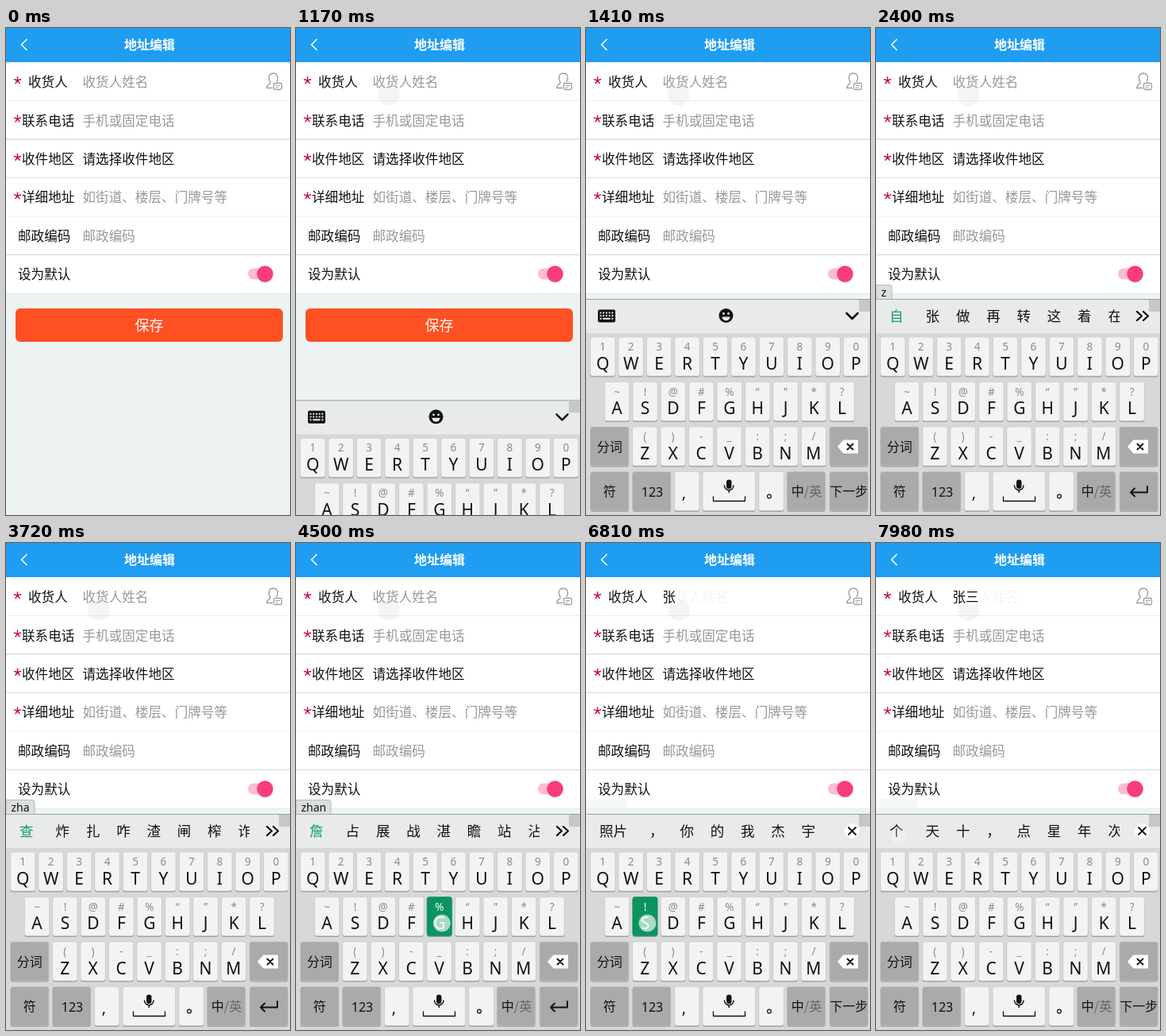
These frames come from a looping animation (358 by 613 pixels, 8000 ms). An HTML page:

```html
<!DOCTYPE html>
<html lang="zh-CN">
<head>
<meta charset="utf-8">
<title>地址编辑</title>
<style>
  html, body { margin: 0; width: 100%; height: 100%; overflow: hidden; background: #edf2f3; }
  svg { display: block; }
  #stage { width: 358px; height: 613px; }
  text { font-family: "Noto Sans CJK SC", "Noto Sans CJK", sans-serif; white-space: pre; }
  .latin { font-family: "Noto Sans", "Open Sans", sans-serif; }
  .key .hint { fill: #8a8a8a; }
  .key.down .face { fill: #0b9460; stroke: #0b9460; }
  .key.down text { fill: #fff; }
  .line { fill: none; stroke-linecap: round; stroke-linejoin: round; }
</style>
</head>
<body>
<svg id="stage" viewBox="0 0 358 613"></svg>
<script>
const LOOP = 8000;
const KEYBOARD_HEIGHT = 272;
const GREEN = '#0f9d6a';

// Each step runs from start to end; its outcome appears on release.
const steps = [
  { start: 2190, end: 2400, key: 'Z', pinyin: 'z', words: '自 张 做 再 转 这 着 在' },
  { start: 2790, end: 3060, key: 'H', pinyin: 'zh', words: '这 张 中 着 只 真 正 知' },
  { start: 3450, end: 3720, key: 'A', pinyin: 'zha', words: '查 炸 扎 咋 渣 闸 榨 诈' },
  { start: 4050, end: 4320, key: 'N', pinyin: 'zhan', words: '詹 占 展 战 湛 瞻 站 沾' },
  { start: 4470, end: 4740, key: 'G', pinyin: 'zhang', words: '张 长 章 掌 涨 丈 仗 帐' },
  { start: 5190, end: 5370, pinyin: '', entered: '张', words: '照片 ， 你 的 我 杰 宇' },
  { start: 6810, end: 7020, key: 'S', pinyin: 's', words: '三 是 上 说 所 时 谁 收' },
  { start: 7740, end: 7980, pinyin: '', entered: '张三', words: '个 天 十 ， 点 星 年 次' }
];
const RELEASE = 120;

const rect = (x, y, w, h, fill, r = 0, extra = '') =>
  `<rect x="${x}" y="${y}" width="${w}" height="${h}" rx="${r}" fill="${fill}" ${extra}/>`;
const path = (d, stroke, width, extra = '') =>
  `<path class="line" d="${d}" stroke="${stroke}" stroke-width="${width}" ${extra}/>`;
const label = (str, x, cy, size, fill = '#111', anchor = 'start', extra = '') =>
  `<text x="${x}" y="${(cy + size * 0.37).toFixed(2)}" font-size="${size}" fill="${fill}" text-anchor="${anchor}" ${extra}>${str}</text>`;

function star(x, y) {
  let d = '';
  for (let i = 0; i < 5; i++) {
    const a = (i * 72 - 90) * Math.PI / 180;
    d += `M${x} ${y}l${(4.3 * Math.cos(a)).toFixed(2)} ${(4.3 * Math.sin(a)).toFixed(2)}`;
  }
  return path(d, '#cc1238', 1.5);
}

function form() {
  const rows = [
    ['收货人', 28, ''],
    ['联系电话', 20, '手机或固定电话'],
    ['收件地区', 20, '请选择收件地区'],
    ['详细地址', 20, '如街道、楼层、门牌号等'],
    ['邮政编码', 15, '邮政编码'],
    ['设为默认', 15, '']
  ];
  const rules = ['#ebeded', '#c9cccc', '#dde1e1', '#eceeee', '#d3d9da', '#e8eded'];
  let out = rect(0, 0, 358, 613, '#edf2f3') + rect(0, 43, 358, 291, '#fff') +
    rect(0, 0, 358, 43, '#1e9df1') + label('地址编辑', 181, 21, 16, '#fff', 'middle', 'font-weight="700"') +
    path('M26 14.5L19.5 21L26 27.5', '#fff', 1.7);
  rows.forEach(([name, x, hint], i) => {
    const cy = 68 + i * 48.4;
    if (i < 4) out += star(14.5, cy - 2);
    out += label(name, x, cy, 16.6) + label(hint, 96.5, cy, 16.6, i === 2 ? '#111' : '#999') +
      rect(0, 91 + i * 48.5, 358, 1, rules[i]);
  });
  return out +
    path('M337 57c-4 0-6 3-5.500 6.500c.3 3 1.500 4 1.800 5.500c-1 2-4.300 2-4.800 6.500h7M337 57c4 0 6 3 5.500 6.500c-.2 2-.7 3-1.300 4', '#9aa0a2', 1.4) +
    rect(337.5, 69.500, 10, 8, '#fff', 1.5, 'stroke="#9aa0a2" stroke-width="1.3"') +
    path('M340 72.500h5M340 75h3', '#9aa0a2', 1) +
    rect(305, 302.500, 28, 14, '#fcbcd2', 7) +
    '<circle cx="326.500" cy="310.500" r="10.300" fill="#d5c5cb"/><circle cx="326.500" cy="309.500" r="10.200" fill="#f93c7c"/>' +
    rect(12, 353, 337, 42, '#ff5023', 6) + label('保存', 180.5, 374, 18, '#fff', 'middle');
}

const keyAt = {};

function keyBase(x, y, w, fill) {
  return rect(x, y + 1.5, w, 49, '#a0a1a2', 3) +
    rect(x, y, w, 49, fill, 3, 'class="face" stroke="#c6c7c8" stroke-width=".6"');
}

function letterRow(letters, hints, firstX, y) {
  return [...letters].map((c, i) => {
    const x = firstX + i * 35.45;
    keyAt[c] = [x, y + 33];
    return `<g class="key" id="key${c}">` + keyBase(x - 15.7, y, 31.4, '#f3f3f3') +
      label(hints[i], x, y + 12, 13.5, '#8a8a8a', 'middle', 'class="latin hint"') +
      label(c, x, y + 33, 21, '#111', 'middle', 'class="latin"') + '</g>';
  }).join('');
}

function keyboard() {
  const dark = '#a8aaab', light = '#f3f3f3';
  const dots = [0, 1, 2].map(r => [0, 1, 2, 3, 4].map(c =>
    r === 2 && c > 0 && c < 4 ? '' : rect(17.5 + c * 3.7, 357.5 + r * 3.7, 2, 2, '#e8e9e9')).join('')).join('');
  return rect(0, 341, 358, 280, '#d6d8d9') + rect(0, 341, 358, 43, '#e9ebeb') +
    rect(0, 341, 358, 1, '#93a5a1') +
    rect(344, 342, 14, 15, '#c6c8c8') +
    '<g id="tools">' + rect(15, 354.500, 22, 16, '#111', 2) + dots + rect(21.2, 364.900, 9.4, 2, '#e8e9e9') +
    '<circle cx="176.500" cy="362" r="9" fill="#111"/><circle cx="173.500" cy="359.500" r="1.400" fill="#e9ebeb"/><circle cx="179.500" cy="359.500" r="1.400" fill="#e9ebeb"/>' +
    '<path d="M171.500 363.500h10a5 5 0 0 1-10 0z" fill="#e9ebeb"/>' +
    path('M328.500 359l7 7l7-7', '#111', 2.5) + '</g>' +
    '<svg width="307" height="613"><g id="words"></g></svg>' +
    '<g id="more">' + path('M329 357l6 5.500l-6 5.500M337 357l6 5.500l-6 5.500', '#111', 2.3) + '</g>' +
    '<g id="close"><circle cx="335.500" cy="362.500" r="9.500" fill="#fff"/>' + path('M331 358l9 9M340 358l-9 9', '#111', 1.8) + '</g>' +
    letterRow('QWERTYUIOP', '1234567890', 21.2, 389) +
    letterRow('ASDFGHJKL', '~!@#%“”*?', 39, 445.5) +
    letterRow('ZXCVBNM', '()-_:;/', 74.2, 502) +
    keyBase(5.5, 502, 48.5, dark) + label('分词', 29.7, 527, 16, '#111', 'middle') +
    keyBase(307, 502, 48.5, dark) +
    '<path d="M317 527l7.500-8.500h18.500v17h-18.500z" fill="#fff"/>' + path('M329.500 523.500l7 7M336.500 523.500l-7 7', '#111', 1.9) +
    keyBase(5.5, 558.500, 48.5, dark) + label('符', 29.7, 583.5, 16, '#111', 'middle') +
    keyBase(58.5, 558.500, 48.5, dark) + label('123', 83.5, 584, 16, '#111', 'middle', 'class="latin"') +
    keyBase(111.5, 558.500, 31.4, light) + label(',', 123.5, 584.5, 20, '#111', 'middle', 'class="latin"') +
    keyBase(147, 558.500, 66.5, light) +
    rect(177, 568.500, 6.5, 11.5, '#111', 3.2) + path('M174.500 576a5.700 5.700 0 0 0 11.500 0M180.200 582v2.500', '#111', 1.5) +
    path('M160.500 590v5.500h40V590', '#111', 1.3) +
    keyBase(218, 558.500, 31.4, light) + '<circle cx="231" cy="589.500" r="2.400" fill="none" stroke="#111" stroke-width="1.200"/>' +
    keyBase(253.3, 558.500, 48.5, dark) +
    label('中<tspan fill="#666">/英</tspan>', 278, 583.5, 16, '#111', 'middle') +
    keyBase(307, 558.500, 48.5, dark) +
    '<g id="next">' + label('下一步', 331.2, 583.5, 16, '#111', 'middle') + '</g>' +
    '<g id="return">' + path('M342 577v7.500h-21M326 579.500l-5 5l5 5', '#111', 2) + '</g>';
}

const stage = document.getElementById('stage');
stage.innerHTML = form() +
  '<circle id="tap" cx="117" cy="84" r="14" fill="#bbb"/>' +
  '<g id="name"></g><g id="trace">' + rect(0, 322, 52, 12, '#f7f8f8') + '</g>' +
  '<g id="keyboard">' + keyboard() + '</g><g id="popup"></g>' +
  '<circle id="touch" r="11" fill="#fff" stroke="#000" stroke-opacity=".1"/>';

const $ = id => document.getElementById(id);
const show = (id, on) => { $(id).style.display = on ? '' : 'none'; };
const clamp = v => Math.min(1, Math.max(0, v));

function wordList(words, highlighted) {
  let x = 52.2;
  return words.split(' ').map((word, i) => {
    const width = 17.5 * word.length;
    if (i === 0) {
      x = 34.7 + width;
      return label(word, 17, 362.5, 17.5, highlighted ? GREEN : '#111');
    }
    const cell = width + 20.8;
    x += cell;
    return label(word, x - cell / 2, 362.5, 17.5, '#111', 'middle');
  }).join('');
}

function pinyinPopup(text) {
  if (!text) return '';
  const width = 13 + [...text].reduce((w, c) => w + (c === 'z' ? 7 : 8), 0);
  return `<path d="M0 323.500H${width - 3}q3 0 3 3V341.500H0z" fill="#dcdfe0" stroke="#a9adae" stroke-width=".8"/>` +
    label(text, 6.5, 333, 14, '#111', 'start', 'class="latin"');
}

function nameField(entered) {
  const hint = label('收货人姓名', 96.5, 68, 16.6, entered ? '#f4f4f4' : '#999');
  if (!entered) return hint;
  return hint + rect(96, 58, 16.6 * entered.length + 1, 20, '#fff') + label(entered, 96.5, 68, 16.6);
}

let shown = null;

function showState(index) {
  if (index === shown) return;
  shown = index;
  const state = steps[index] || { pinyin: '', words: '' };
  const entered = steps.slice(0, index + 1).reduce((s, step) => step.entered || s, '');
  $('words').innerHTML = state.words ? wordList(state.words, state.pinyin) : '';
  $('popup').innerHTML = pinyinPopup(state.pinyin);
  $('name').innerHTML = nameField(entered);
  show('tools', index < 0);
  show('more', state.pinyin);
  show('close', index >= 0 && !state.pinyin);
  show('next', !state.pinyin);
  show('return', state.pinyin);
  show('trace', entered && !state.pinyin);
}

function render(t) {
  let index = -1;
  steps.forEach((step, i) => { if (t >= step.end - RELEASE) index = i; });
  showState(index);

  const rise = clamp((t - 1095) / 310);
  $('keyboard').setAttribute('transform', `translate(0 ${(KEYBOARD_HEIGHT * Math.pow(1 - rise, 2.7)).toFixed(2)})`);
  show('keyboard', rise > 0);

  $('tap').setAttribute('opacity', t < 900 ? 0 : 0.15 + 0.35 * clamp((1150 - t) / 150));

  let opacity = 0;
  for (const step of steps) {
    const active = t >= step.start && t < step.end;
    if (step.key) $('key' + step.key).classList.toggle('down', active && t < step.end - RELEASE);
    const lingers = step === steps[steps.length - 1];
    if (!active && !(lingers && t >= step.end)) continue;
    const [x, y] = step.key ? keyAt[step.key] : [29, 369];
    $('touch').setAttribute('cx', step.key ? x + 3 : x);
    $('touch').setAttribute('cy', y);
    opacity = Math.max(lingers ? 0.25 : 0, 0.65 * clamp((step.end - t) / RELEASE));
  }
  $('touch').setAttribute('opacity', opacity);
}

const origin = performance.now();
function tick() {
  render((performance.now() - origin) % LOOP);
  requestAnimationFrame(tick);
}
tick();
</script>
</body>
</html>
```
